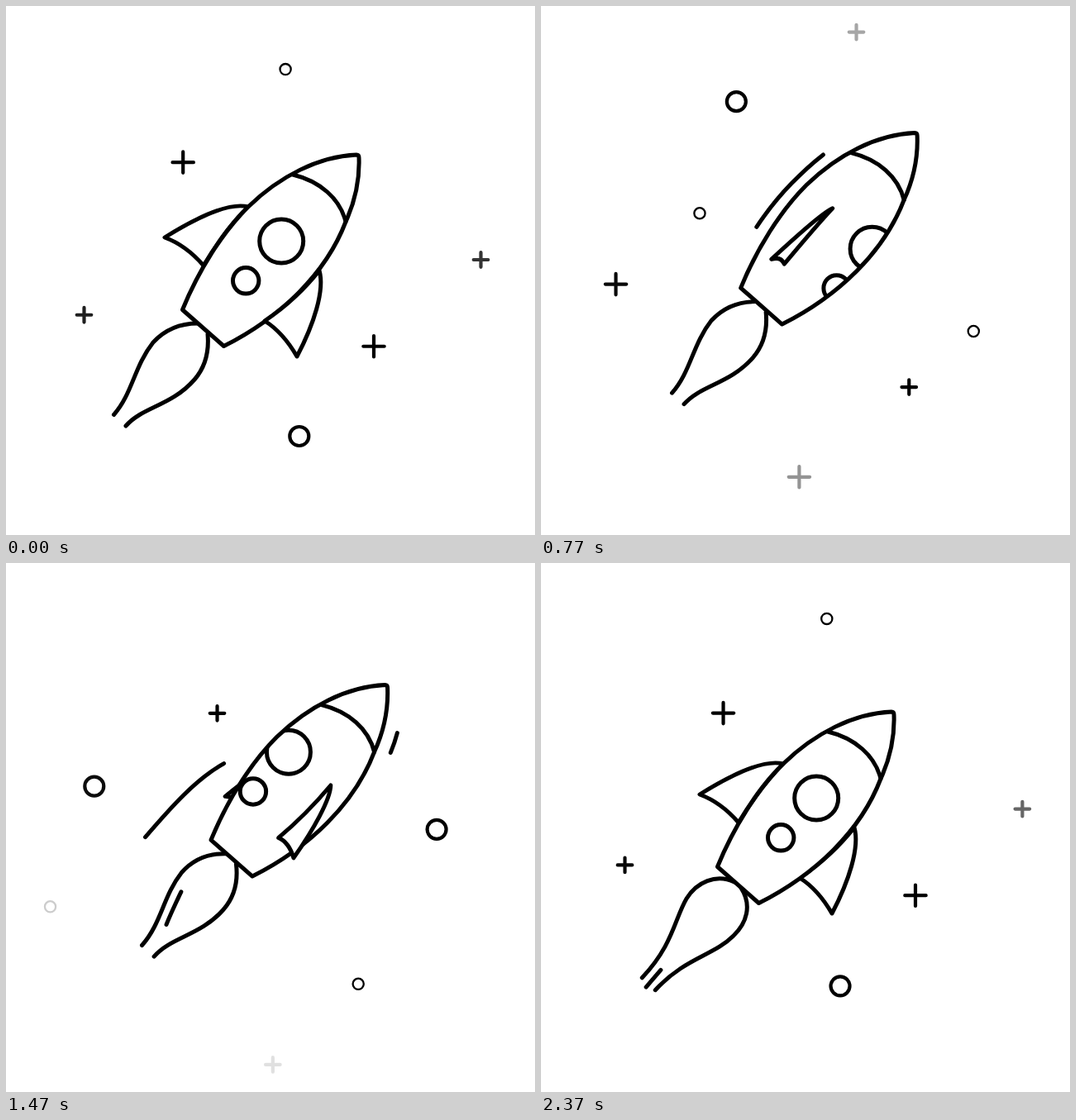
An HTML page that plays this animation: 640x640 px, repeating every 2.4 s.

```html
<!DOCTYPE html>
<html lang="en">
<head>
<meta charset="utf-8">
<title>Rocket</title>
<style>
  html, body { margin: 0; width: 100%; height: 100%; overflow: hidden; background: #fff; }
  svg { display: block; width: 100vw; height: 100vh; }
  svg * { stroke-linecap: round; stroke-linejoin: round; }
  #stars, #rocket { fill: none; stroke: #000; }
  #rocket { stroke-width: 5; }
  .solid { fill: #fff; }
</style>
</head>
<body>
<svg viewBox="0 0 640 640">
  <defs>
    <clipPath id="hull"><use href="#body"/></clipPath>
  </defs>
  <g id="stars"></g>
  <g id="rocket">
    <path id="flame"/>
    <g id="streaks"></g>
    <path id="backFin" class="solid"/>
    <path id="body" class="solid" d="M213.5 367.5C233 320 261 275 293 243C331 206 378 182 424 180Q427 180 427 183.5C428 209 422 237 411 261C387 324 332 377 263.5 411.5Z"/>
    <path d="M347 204C380 212 404 233 411 261"/>
    <g clip-path="url(#hull)">
      <g class="windows"><circle cx="333.2" cy="284.5" r="26.5"/><circle cx="290.2" cy="332.3" r="15.7"/></g>
      <g class="windows"><circle cx="333.2" cy="284.5" r="26.5"/><circle cx="290.2" cy="332.3" r="15.7"/></g>
    </g>
    <path id="frontFin" class="solid"/>
  </g>
</svg>
<script>
const LOOP = 2400, STEP = 40, PEAK = LOOP / 2, LAST = LOOP - STEP;
const FLICKER = 250, FADE_IN = 200, FADE_OUT = 430;
const SLOPE = 1.192;

const $ = id => document.getElementById(id);
const clamp = v => Math.min(1, Math.max(0, v));
const lerp = (a, b, k) => a + (b - a) * k;
const smooth = k => k * k * (3 - 2 * k);

function add(parent, tag, attrs) {
  const el = document.createElementNS('http://www.w3.org/2000/svg', tag);
  for (const key in attrs) el.setAttribute(key, attrs[key]);
  return parent.appendChild(el);
}

// Blends two path strings that differ only in their numbers.
function morph(from, to) {
  const goal = to.match(/[\d.]+/g);
  return k => {
    let i = 0;
    return from.replace(/[\d.]+/g, n => lerp(+n, +goal[i++], k).toFixed(2));
  };
}

const fin = morph(
  'M379 320C386 344 372 386 352 424C341 405 329 391 313 381C338 364 361 343 379 320Z',
  'M293 243C270 237 229 257 192 280C211 287 226 299 239 314C254 289 272 263 293 243Z');
const flame = morph(
  'M232 384C207 384 190 394 178 407C155 436 153 469 130.5 494.5M244 397C246 420 241 437 228 452C200 484 165 485 145 508',
  'M234 386C212 375 188 386 176 406C162 430 160 462 122 502M242 393C256 414 249 436 233 451C209 475 175 477 138 517');

// Stars slide down parallel lanes: y = lane - SLOPE * x.
const ring = r => `M${-r} 0a${r} ${r} 0 1 0 ${2 * r} 0a${r} ${r} 0 1 0 ${-2 * r} 0Z`;
const cross = r => `M${-r} 0H${r}M0 ${-r}V${r}`;
const stars = [];

// A lane is entered at the top or right edge; seamX is the place where the loop restarts.
function star(d, width, lane, start, end, endX, seamX) {
  const el = add($('stars'), 'path', { d, 'stroke-width': width });
  const startX = Math.min(606, (lane - 17) / SLOPE);
  stars.push({ el, lane, start, end, startX, endX, seamX });
}
star(ring(6.6), 2.3, 479.6, 2140, 3966, 37);
star(ring(6.6), 2.3, 1017.3, 147, 2030, 352);
star(ring(11.5), 4.2, 397.4, 300, 1890, 33);
star(ring(11.5), 4.2, 943.4, 1010, 2833, 267, 354.8);
star(cross(12.7), 4.2, 444.5, 1490, 3575, 23, 214.2);
star(cross(12.7), 4.2, 942.2, 1595, 3340, 281, 445);
star(cross(8.8), 4.2, 991.8, 2240, 3932, 314, 574.5);
star(cross(8.8), 4.2, 486.4, 690, 2777, 33, 94.5);

function starX(s, t) {
  const along = (t0, x0, t1, x1) => lerp(x0, x1, (t - t0) / (t1 - t0));
  if (!s.seamX) return along(s.start, s.startX, s.end, s.endX);
  return t < LOOP ? along(s.start, s.startX, LOOP, s.seamX) : along(LOOP, s.seamX, s.end, s.endX);
}

// A streak is drawn along its path in `time`, and erased the same way after `delay`.
const streaks = [];
function streak(d, time, delay, ...starts) {
  for (const start of starts)
    streaks.push({ el: add($('streaks'), 'path', { d, pathLength: 1 }), time, delay, start });
}
const rightSide = 'M444.5 185.5C446 231 432 270 404 309';
streak('M383 169C343 181 308 207 275 241C239 278 218 316 199 351L170 401', 325, 120, 120, 560, 1608);
streak(rightSide, 200, 170, 214, 788);
streak(rightSide, 200, 38, 1362, 1854);
streak('M229 275C195 294 165 328 134 364', 150, 150, 1330);
streak('M230 397C198 392 183 418 175 435C170 446 165 456 159 471', 180, 70, 66, 235, 493, 1302, 1780);
streak('M227 406C215 432 202 456 180 471C168 476 156 482 146 492', 180, 60, 334, 495);
streak('M152 484L116.5 525.5', 120, 60, 854, 949, 2276);
streak('M244.5 450.5Q236 458 227.5 464.5', 100, 110, 1775);

const windows = document.querySelectorAll('.windows');

function draw(t) {
  // Half a roll on the way up, the other half on the way down.
  const up = t < PEAK;
  const turn = up ? t / PEAK : (t - PEAK) / (LAST - PEAK);
  const lift = smooth(up ? turn : 1 - turn);
  $('rocket').setAttribute('transform', `translate(${40.5 * lift} ${-38 * lift})`);
  $('frontFin').setAttribute('d', fin(turn));
  $('backFin').setAttribute('d', fin(1 - turn));
  $('flame').setAttribute('d', flame((1 - Math.cos(2 * Math.PI * t / FLICKER)) / 2));
  windows.forEach((el, i) =>
    el.setAttribute('transform', `translate(${-107 * (turn - i)} ${-97 * (turn - i)})`));

  for (const s of streaks) {
    const head = clamp((t - s.start) / s.time);
    const tail = clamp((t - s.start - s.delay) / s.time);
    s.el.style.display = head > tail ? '' : 'none';
    s.el.setAttribute('stroke-dasharray', `${head - tail} 3`);
    s.el.setAttribute('stroke-dashoffset', -tail);
  }

  for (const s of stars) {
    const u = t < s.start ? t + LOOP : t;
    const x = starX(s, u);
    s.el.setAttribute('transform', `translate(${x} ${s.lane - SLOPE * x})`);
    s.el.setAttribute('opacity', Math.min(clamp((u - s.start) / FADE_IN), clamp((s.end - u) / FADE_OUT)));
  }
}

// Poses are 40 ms apart, shown on a 30 per second clock.
function pose(ms) {
  const tick = Math.floor(((ms % LOOP) + 4) * .03) % 72;
  return Math.max(0, Math.round(tick * 5 / 6 - .1)) * STEP;
}

const begin = performance.now();
function loop() {
  draw(pose(Math.max(0, performance.now() - begin)));
  requestAnimationFrame(loop);
}
loop();
</script>
</body>
</html>
```
